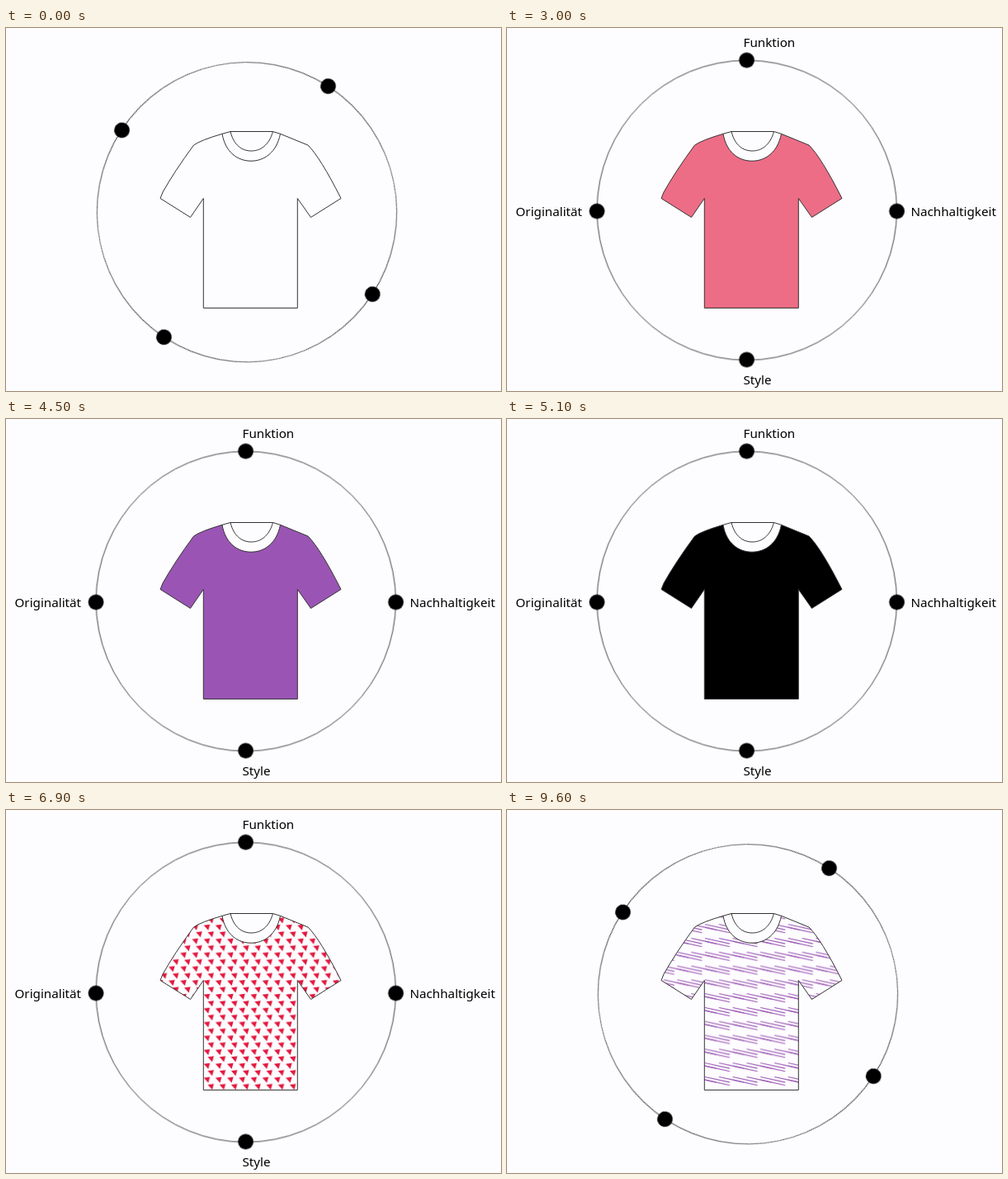
These frames come from a looping animation (600x440 px, 10000 ms). An HTML page:

```html
<!DOCTYPE html>
<html lang="de">
<head>
<meta charset="utf-8">
<title>T-Shirt</title>
<style>
  html, body { margin: 0; width: 100%; height: 100%; overflow: hidden; background: #fdfcfe; }
  svg { display: block; width: 600px; height: 440px; }
  text { font: 15.2px "Noto Sans", "Open Sans", sans-serif; fill: #000; }
  .line { fill: none; stroke: #333; stroke-width: 1; stroke-linejoin: round; }

  .anim { animation: 10s linear infinite; }
  #ring { animation-name: turn; }
  #labels { animation-name: labels-out; }
  #funktion { animation-name: in-funktion; }
  #nachhaltigkeit { animation-name: in-nachhaltigkeit; }
  #style { animation-name: in-style; }
  #originalitaet { animation-name: in-originalitaet; }
  #solid { animation-name: dye; }
  #dotted { animation-name: dotted; }
  #triangles { animation-name: triangles; }
  #dashes { animation-name: dashes; }

  @keyframes turn {
    0%, 3% { transform: translate(290.7px, 222.4px) rotate(123.2deg); animation-timing-function: steps(6); }
    9%, 90% { transform: translate(290.7px, 222.4px) rotate(0deg); animation-timing-function: steps(6); }
    96%, 100% { transform: translate(290.7px, 222.4px) rotate(123.2deg); }
  }
  @keyframes in-funktion {
    0%, 8% { opacity: 0; animation-timing-function: steps(2); }
    10%, 100% { opacity: 1; }
  }
  @keyframes in-nachhaltigkeit {
    0%, 10% { opacity: 0; animation-timing-function: steps(2); }
    12%, 100% { opacity: 1; }
  }
  @keyframes in-style {
    0%, 12% { opacity: 0; animation-timing-function: steps(2); }
    14%, 100% { opacity: 1; }
  }
  @keyframes in-originalitaet {
    0%, 14% { opacity: 0; animation-timing-function: steps(2); }
    16%, 100% { opacity: 1; }
  }
  @keyframes labels-out {
    0%, 79% { opacity: 1; animation-timing-function: steps(2); }
    81%, 100% { opacity: 0; }
  }
  @keyframes dye {
    0%, 25% { fill: #fdfcfe; animation-timing-function: steps(8); }
    33%, 34% { fill: #e3173e; animation-timing-function: steps(5); }
    39% { fill: #50a36e; animation-timing-function: steps(6); }
    45% { fill: #9a55b4; animation-timing-function: steps(6); }
    51%, 52% { fill: #000; animation-timing-function: steps(5); }
    57%, 100% { fill: #fdfcfe; }
  }
  @keyframes dotted {
    0%, 52% { opacity: 0; animation-timing-function: steps(5); }
    57%, 58% { opacity: .9; animation-timing-function: steps(1); }
    59% { opacity: 1; animation-timing-function: steps(10); }
    69%, 100% { opacity: 0; }
  }
  @keyframes triangles {
    0%, 59% { opacity: 0; animation-timing-function: steps(10); }
    69% { opacity: 1; animation-timing-function: steps(4); }
    73%, 100% { opacity: 0; }
  }
  @keyframes dashes {
    0%, 69% { opacity: 0; animation-timing-function: steps(4); }
    73%, 74% { opacity: .5; animation-timing-function: steps(3); }
    77%, 100% { opacity: 1; }
  }
</style>
</head>
<body>
<svg viewBox="0 0 600 440">
  <defs>
    <path id="body" d="M262 128.3Q236 136 227.5 142Q204 174 190 199L187 206.5L223.5 229.5L239.3 206.5V339.4H353.3V206.5L369.5 229.5L406 206.5Q381 157 366 142L332.5 128.3C328 151 313 161.2 297 161.2S266 151 262 128.3Z"/>
    <pattern id="dot-fill" patternUnits="userSpaceOnUse" x="246.1" y="261.6" width="16.8" height="16.8">
      <path d="M9.7 15.5L16.8 8.4M0 8.4L7.1 1.3" stroke="#7fcca0" stroke-width=".95"/>
      <circle cx="8.4" cy="8.4" r="2.1" fill="#ea2f59"/>
    </pattern>
    <pattern id="triangle-fill" patternUnits="userSpaceOnUse" x="239" y="222" width="14.2" height="16.8">
      <g fill="#e3173e">
        <path id="tri" d="M.7 1.7L8.2 .7L6.2 7.9Z"/>
        <use href="#tri" x="4.8" y="8.4"/>
      </g>
    </pattern>
    <pattern id="dash-fill" patternUnits="userSpaceOnUse" x="240" y="322" width="33.6" height="16.8">
      <g stroke="#9a55b4" stroke-width="1.15">
        <path id="dash" d="M0 1.5L30 8"/>
        <use href="#dash" y="3.6"/>
        <use href="#dash" x="17"/>
        <use href="#dash" x="-16.6"/>
      </g>
    </pattern>
  </defs>

  <!-- The ring sits slightly off its pivot -->
  <g id="ring" class="anim">
    <circle class="line" cy="-1.5" r="181.7" style="stroke-width:.9"/>
    <circle cx="-.2" cy="-183.4" r="9.4"/>
    <circle cx="181.8" cy="-.4" r="9.4"/>
    <circle cx="-.2" cy="179.6" r="9.4"/>
    <circle cx="-181.7" cy="-.4" r="9.4"/>
  </g>

  <use id="solid" class="anim" href="#body"/>
  <use id="dotted" class="anim" href="#body" fill="url(#dot-fill)"/>
  <use id="triangles" class="anim" href="#body" fill="url(#triangle-fill)"/>
  <use id="dashes" class="anim" href="#body" fill="url(#dash-fill)"/>
  <use class="line" href="#body"/>
  <path class="line" d="M262 128.3L272 125.5H323.5L332.5 128.3M272 125.5C276 142 286 149 297.3 149S319 142 323.5 125.5"/>

  <g id="labels" class="anim">
    <text id="funktion" class="anim" x="286.5" y="22.5">Funktion</text>
    <text id="nachhaltigkeit" class="anim" x="489.5" y="227.5">Nachhaltigkeit</text>
    <text id="style" class="anim" x="286.5" y="432">Style</text>
    <text id="originalitaet" class="anim" x="10.5" y="227.5">Originalität</text>
  </g>
</svg>
</body>
</html>
```
